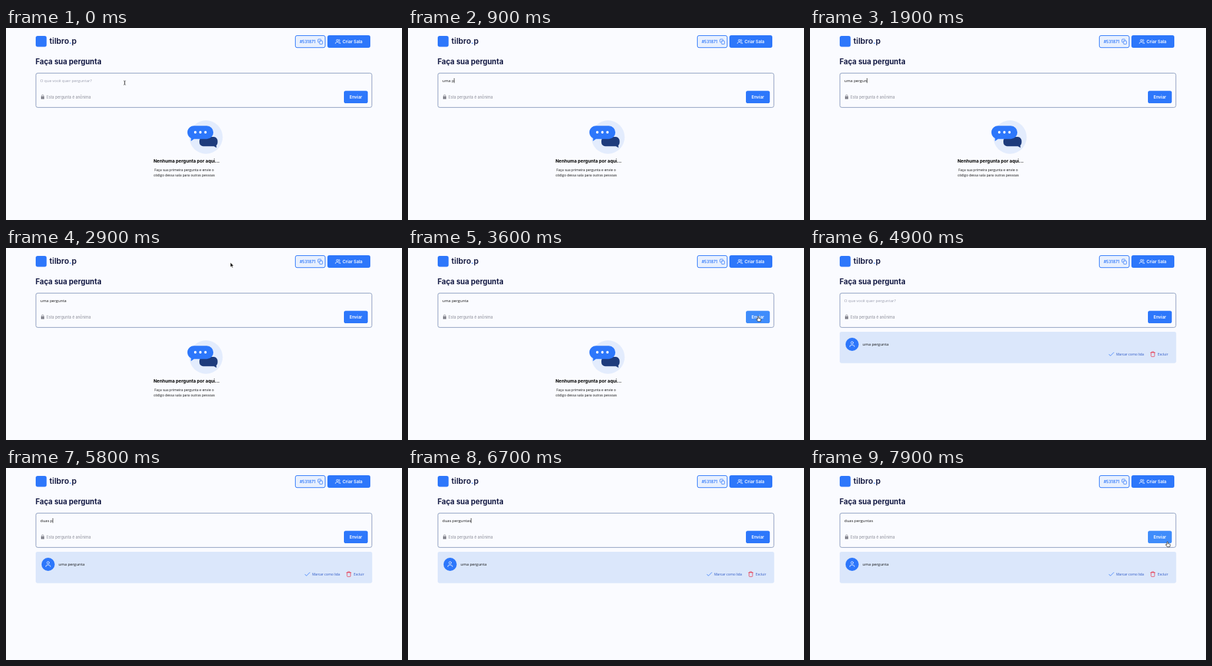
An HTML page for the animation above (8 s loop, 600 by 291 pixels).

```html
<!DOCTYPE html>
<html lang="pt">
<head>
<meta charset="utf-8">
<title>Faça sua pergunta</title>
<style>
  html, body { margin: 0; width: 100%; height: 100%; overflow: hidden; background: #fafbff; }
  svg { display: block; width: 600px; height: 291px; }
  text { white-space: pre; font-family: "Open Sans", "Noto Sans", sans-serif; font-size: 6px; }
  .ui { font-family: Inter, "Open Sans", sans-serif; }
  .bold { font-weight: 700; }
  .semi { font-weight: 600; }
  .small { font-size: 5.24px; }
  .action { font-size: 5.2px; font-weight: 500; fill: #2452c4; }
  .line { fill: none; stroke-linecap: round; stroke-linejoin: round; stroke-width: .8; }
</style>
</head>
<body>
<svg viewBox="0 0 600 291" xmlns="http://www.w3.org/2000/svg">
  <rect width="600" height="291" fill="#fafbff"/>

  <!-- header -->
  <rect x="45" y="12" width="16.5" height="16.5" rx="3" fill="#2d77fb"/>
  <text class="ui semi" x="65.8" y="24" fill="#13183f" style="font-size:12px">tilbro<tspan fill="#2d77fb">.</tspan>p</text>

  <rect x="438.4" y="11.5" width="45.2" height="18.2" rx="2.6" fill="#e8f0fe" stroke="#2d77fb"/>
  <text class="ui semi" x="445" y="22.6" fill="#2d77fb">#531871</text>
  <g class="line" stroke="#2d77fb">
    <rect x="475" y="19.6" width="4.6" height="4.8" rx=".7"/>
    <path d="M474 21.6h-.6a.7.7 0 0 1-.7-.7v-3.2a.7.7 0 0 1 .7-.7h3.2a.7.7 0 0 1 .7.7v.8"/>
  </g>

  <rect x="487" y="11" width="65" height="19" rx="3" fill="#2d77fb"/>
  <g class="line" stroke="#fff" style="stroke-width:.7">
    <circle cx="502" cy="18.9" r="1.5"/>
    <path d="M499.2 23.6v-.6a1.5 1.5 0 0 1 1.5-1.5h2.6a1.5 1.5 0 0 1 1.5 1.5v.6M504.3 17.4a1.5 1.5 0 0 1 0 3M506.6 23.6v-.6a1.5 1.5 0 0 0-1.1-1.4"/>
  </g>
  <text class="ui semi" x="510" y="22.6" fill="#fff" style="font-size:6.4px">Criar Sala</text>

  <!-- question form -->
  <text class="ui bold" x="44.7" y="54.5" fill="#141a44" style="font-size:11.1px">Faça sua pergunta</text>
  <rect x="45.3" y="68.4" width="509" height="52" rx="2.8" fill="#fafbff" stroke="#8094b8" stroke-width=".9"/>
  <text id="hint" x="51.8" y="81.6" fill="#9a9dad">O que você quer perguntar?</text>
  <text id="typed" x="52" y="81.6" fill="#111"></text>
  <path id="caret" d="M0 76v7.3" stroke="#111" stroke-width=".7"/>
  <rect x="53" y="103.6" width="5" height="4.2" rx=".6" fill="#85868f"/>
  <path class="line" d="M54.1 103.6v-1a1.4 1.4 0 0 1 2.8 0v1" stroke="#85868f"/>
  <text class="ui" x="61.2" y="106.7" fill="#8b8d98" style="font-size:5.75px">Esta pergunta é anônima</text>
  <rect id="send" x="512" y="95.2" width="36.2" height="18.8" rx="2.8"/>
  <text class="ui semi" x="530" y="106.6" fill="#fff" text-anchor="middle" style="font-size:6.35px">Enviar</text>

  <g id="empty">
    <circle cx="303" cy="165.4" r="25.3" fill="#e3ecfd"/>
    <path d="M299 165h16a6 6 0 0 1 5.6 6v2.5q0 3-2 4.5l.4 3.6-4-2.4h-16a6 6 0 0 1-6-6v-2.2a6 6 0 0 1 6-6z" fill="#1d3b7c"/>
    <path d="M284.6 148.2h19.6a10 10 0 0 1 0 20h-19.4l-4.6 3.4.2-4.4a10 10 0 0 1 4.2-19z" fill="#2d77fb"/>
    <g fill="#fff">
      <circle cx="286.8" cy="158" r="1.9"/><circle cx="294.5" cy="158" r="1.9"/><circle cx="302.2" cy="158" r="1.9"/>
    </g>
    <text class="ui bold" x="223.4" y="204" style="font-size:6.85px">Nenhuma pergunta por aqui...</text>
    <text class="small" x="225" y="217.2" fill="#111">Faça sua primeira pergunta e envie o</text>
    <text class="small" x="223.4" y="224.6" fill="#111">código dessa sala para outras pessoas</text>
  </g>

  <g id="card">
    <rect x="45" y="127" width="509.8" height="47.4" rx="2.8" fill="#dbe7fb"/>
    <circle cx="63.8" cy="146" r="10" fill="#2d77fb"/>
    <g class="line" stroke="#fff">
      <circle cx="63.8" cy="143.6" r="1.8"/>
      <path d="M60.5 149.6v-.7a1.8 1.8 0 0 1 1.8-1.8h3a1.8 1.8 0 0 1 1.8 1.8v.7"/>
    </g>
    <text x="79.5" y="148.4" fill="#111">uma pergunta</text>
    <path class="line" d="M453 161.2l2.2 2.2 5-5" stroke="#2d77fb"/>
    <text class="action" x="463.9" y="162.8">Marcar como lida</text>
    <path class="line" d="M516 158.6h6.8M517.8 158.4v-1.2h3.2v1.2M516.8 158.8v5a.9.9 0 0 0 .9.9h3.4a.9.9 0 0 0 .9-.9v-5" stroke="#e8384f"/>
    <text class="action" x="526.8" y="162.8">Excluir</text>
  </g>

  <!-- pointers, tip at 0,0 -->
  <g id="beam"><path class="line" d="M-1.3-3q1.3 0 1.3.8v4.6q0 .8-1.3.8M1.3-3q-1.3 0-1.3.8v4.6q0 .8 1.3.8" stroke="#222" style="stroke-width:.6"/></g>
  <g id="hand"><path d="M-.8.6q0-1 .8-1t.8 1v2l2.6.6q1 .3.8 1.4l-.6 2.8h-4l-2-2.6q-.7-1.2.2-1.3l1.4.8z" fill="#fff" stroke="#111" stroke-width=".7" stroke-linejoin="round"/></g>
  <g id="arrow"><path d="M0 0v7l1.6-1.5 1.2 2.6 1.1-.5-1.1-2.5h2.2z" fill="#111" stroke="#fff" stroke-width=".5"/></g>
</svg>
<script>
const LOOP = 8000, STEP = 100;
const $ = id => document.getElementById(id);
const show = (id, on) => $(id).style.display = on ? "" : "none";
const pen = document.createElement("canvas").getContext("2d");

// one time per typed letter
const drafts = [
  { text: "uma pergunta", end: 3800, blur: 3500,
    keys: [300, 500, 700, 800, 900, 1000, 1200, 1400, 1500, 1900, 2100, 2200] },
  { text: "duas perguntas", end: LOOP, blur: 7700,
    keys: [5000, 5200, 5300, 5400, 5600, 5800, 5900, 6000, 6100, 6200, 6400, 6500, 6600, 6700] }
];

// visible stretches of the pointer: [time, x, y]
const moves = [
  [[0, 179.8, 83], [300, 179.8, 83]],
  [[2400, 310, -3], [2500, 310, -3]],
  [[2900, 340, 22], [3400, 530, 103.5], [3700, 530.8, 104], [3800, 513.6, 104.8], [4100, 300, 85], [4600, 300, 85]],
  [[6900, 597, 88], [7500, 532, 105], [7700, 532, 105], [7900, 541.6, 112], [8000, 541.6, 112]]
];

const inside = (p, x, y, w, h) => p.x >= x && p.x <= x + w && p.y >= y && p.y <= y + h;

function pointerAt(t) {
  const path = moves.find(m => t >= m[0][0] && t < m[m.length - 1][0]);
  if (!path) return null;
  const i = path.findIndex(k => k[0] > t);
  const [t0, x0, y0] = path[i - 1], [t1, x1, y1] = path[i];
  const u = (t - t0) / (t1 - t0), e = u * u * (3 - 2 * u);
  return { x: x0 + (x1 - x0) * e, y: y0 + (y1 - y0) * e };
}

function caretOn(t, draft, count) {
  if (count) return t < draft.blur && (t - draft.keys[count - 1]) % 1000 < 500;
  return t >= 4300 && t < 4800;
}

function render(t) {
  const draft = drafts.find(d => t < d.end);
  const count = draft.keys.filter(k => k <= t).length;
  const text = draft.text.slice(0, count);
  const sent = t >= drafts[0].end;

  $("typed").textContent = text;
  show("hint", !count);
  show("empty", !sent);
  show("card", sent);

  pen.font = '60px "Open Sans", "Noto Sans", sans-serif';
  $("caret").setAttribute("transform", `translate(${52.2 + pen.measureText(text).width / 10} 0)`);
  show("caret", caretOn(t, draft, count));

  const p = pointerAt(t);
  const onSend = p && inside(p, 512, 95, 36.2, 19);
  const kind = !p ? "" : onSend ? "hand" : inside(p, 45, 68, 510, 53) ? "beam" : "arrow";
  for (const id of ["beam", "hand", "arrow"]) {
    show(id, id === kind);
    if (p) $(id).setAttribute("transform", `translate(${p.x} ${p.y})`);
  }
  const hover = onSend && !(t >= 3800 && t < 4600);
  $("send").setAttribute("fill", hover ? "#3f8cfb" : "#2d77fb");
}

function tick() {
  const t = performance.now() % LOOP;
  render(Math.floor(t / STEP) * STEP);
  requestAnimationFrame(tick);
}
tick();
</script>
</body>
</html>
```
